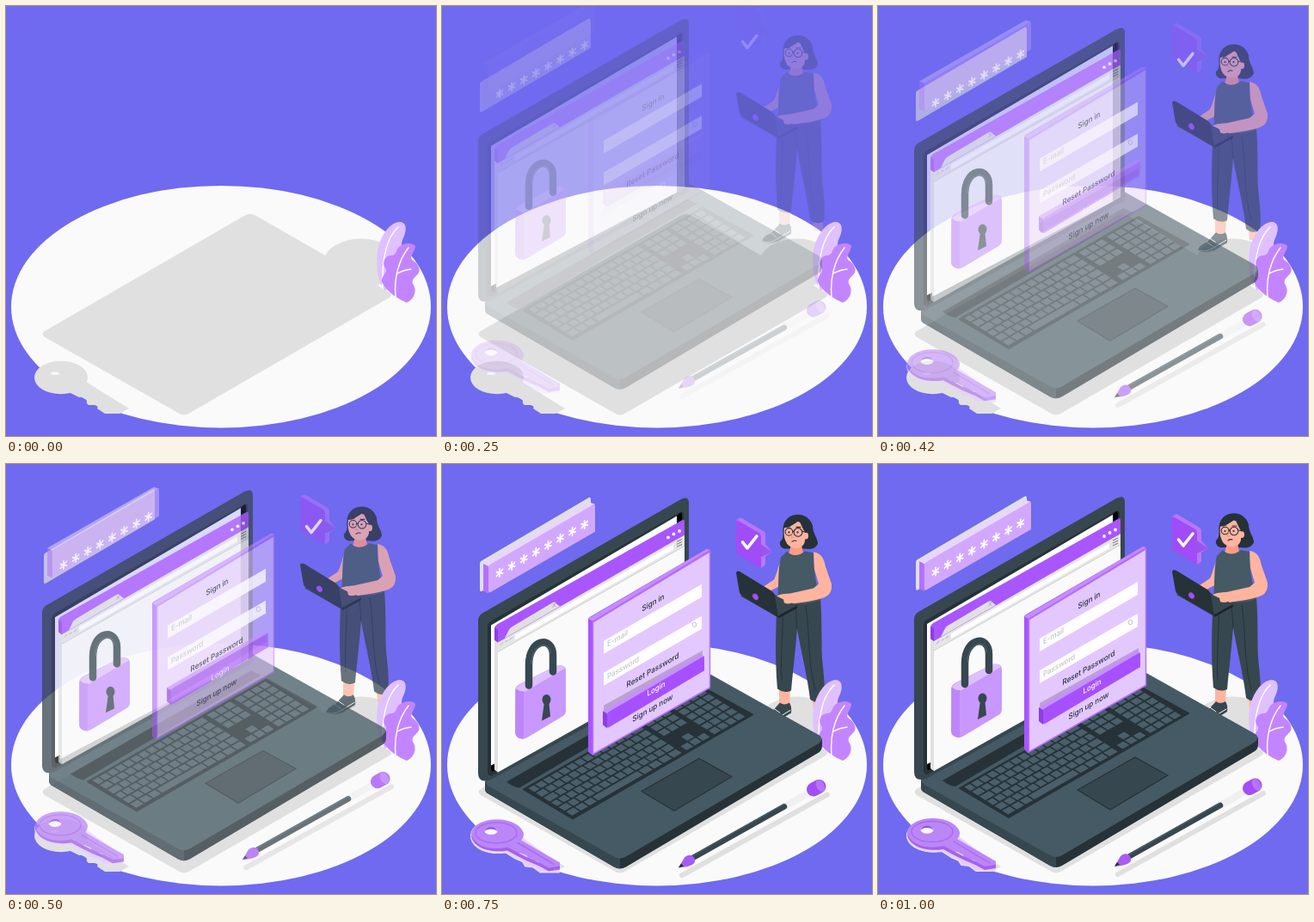
An HTML page for the animation above (1.04 s loop, 500x500 px).

```html
<!DOCTYPE html>
<html lang="en">
<head>
<meta charset="utf-8">
<title>Sign in</title>
<style>
html, body { margin: 0; width: 100%; height: 100%; overflow: hidden; background: #6f6aef; }
svg { display: block; width: 100vw; height: 100vh; }
text { font: 500 9.2px Inter, Roboto, sans-serif; fill: #263238; }
.line { fill: none; stroke-linecap: round; stroke-linejoin: round; }
</style>
</head>
<body>
<svg viewBox="0 0 500 500">
  <ellipse cx="250" cy="349.7" rx="244" ry="140.8" fill="#fafafa"/>

  <!-- floor shadows -->
  <g fill="#e0e0e0">
    <ellipse cx="413" cy="299" rx="44" ry="28.5"/>
    <path d="M45 378 L277 244 Q284 240 291 244 L446 333 Q450 336 446 339 L214 473 Q207 478 200 473 L45 385 Q40 381 45 378Z"/>
    <ellipse cx="64" cy="432" rx="31" ry="19.3"/>
    <path d="M93 437 L143 468 L132 474 H115 L106 468 Q108 465 103 464 L96 464 Q93 462 94 459 Q90 454 85 455 L73 449Z"/>
  </g>
  <ellipse cx="57" cy="427.3" rx="5" ry="1.7" fill="#fafafa"/>

  <!-- woman -->
  <g data-depth="1">
    <path d="M397 70 C401 54 425 52 431 70 C431 80 437 84 437 91 C434 98 427 98 421 97 L402 97 C396 98 392 94 393 89 C399 84 395 78 397 70Z" fill="#263238"/>
    <path d="M392 261 H405 L404 279 L392 278Z M431 272 H443 V284 L432 285Z" fill="#ffb4a0"/>
    <path d="M404 276 Q407 281 406 288 L391 297 Q378 301 372 297 Q373 291 383 287 L393 276 Q398 280 404 276Z" fill="#37474f"/>
    <path d="M373 297 Q381 300 390 294 L405 285 M382 287 L389 292 M386 283 L393 288" class="line" stroke="#fafafa" stroke-width="1"/>
    <path d="M390 156 L440 155 C442 180 441 205 442 225 C444 245 446 260 444 274 Q435 278 428 272 C425 245 417 215 413 190 C411 215 408 240 406 262 Q398 266 390 260 C387 225 388 185 390 156Z" fill="#37474f"/>
    <path d="M413 190 L411 164 M423 164 C428 195 425 230 434 262 M396 166 C397 200 393 225 395 250" class="line" stroke="#263238" stroke-width="1"/>
    <path d="M398 105 C391 113 390 126 386 133 L374 141 L380 147 L395 139 L405 112Z" fill="#ffb4a0"/>
    <path d="M406 92 H418 L420 103 Q412 111 403 104Z" fill="#ff9c85"/>
    <path d="M401 100 Q410 109 422 100 L433 102 C431 116 434 135 440 157 Q417 165 390 157 C392 140 390 124 394 107Z" fill="#455a64"/>
    <path d="M432 101 C441 102 444 108 446 118 L453 138 Q454 149 446 153 C432 159 414 159 404 162 Q394 162 390 157 L391 151 L405 149 L432 143 L438 138 L433 121Z" fill="#ffb4a0"/>
    <path d="M398 72 C402 64 416 63 422 70 L422 88 C420 99 406 98 401 91 C398 86 397 80 398 72Z" fill="#ffb4a0"/>
    <path d="M397 73 C404 72 411 68 415 64 C419 71 420 77 425 80 L430 70 L419 60 L404 60Z" fill="#263238"/>
    <ellipse cx="423" cy="82" rx="3" ry="4" fill="#ffb4a0"/>
    <g class="line" stroke="#263238" stroke-width="1.1">
      <circle cx="403.5" cy="77.5" r="4.3"/><circle cx="414" cy="78" r="4.8"/>
      <path d="M408 77 H409 M419 77 L424 78 M401 72 L405 71 M412 72 L417 72 M407 89 Q410 87 412 88"/>
    </g>
    <g fill="#263238"><circle cx="403.5" cy="78" r="1.1"/><circle cx="413.5" cy="78" r="1.1"/></g>
    <path d="M408 79 L406 84 H409" class="line" stroke="#f28f7a" stroke-width="1"/>
    <path d="M347 152 L372 143 L413 163 L391 177Z" fill="#37474f"/>
    <path d="M342 125 Q343 122 347 124 L383 146 Q386 148 387 151 L391 177 L351 153 Q347 151 346 148Z" fill="#263238"/>
    <path d="M391 175 L413 163 L413 166 L391 178Z" fill="#1b252a"/>
    <ellipse cx="364.5" cy="153" rx="3" ry="4" transform="rotate(-35 364.5 153)" fill="#a24dff"/>
    <path d="M389 152 Q397 148 409 150 L412 157 Q404 163 398 160 L397 156Z" fill="#ffb4a0"/>
  </g>

  <!-- leaves -->
  <path d="M441 331 C432 322 430 302 432 284 C436 266 446 252 458 251 C467 252 466 262 461 272 C457 284 463 300 455 320Z" fill="#dfc1ff"/>
  <path d="M438 328 C437 300 440 272 456 257" class="line" stroke="#fff" stroke-width="1.4"/>
  <path d="M466 345 C457 341 444 334 437 321 C436 314 443 311 442 306 C436 298 441 291 447 290 C454 291 453 284 457 280 C462 276 472 274 476 279 C476 285 469 291 472 295 C479 299 482 306 480 310 C477 315 471 317 473 323 C478 330 476 340 466 345Z" fill="#c385ff"/>
  <path d="M453 338 C451 318 456 296 468 281 M455 311 Q462 307 471 306" class="line" stroke="#fff" stroke-width="1.4"/>

  <!-- laptop -->
  <g data-depth="1">
    <path d="M50 367 V376 Q50 380 54 382 L200 467 Q207 471 214 467 L438 334 Q442 331 442 326 V318 L207 440Z" fill="#263238"/>
    <path d="M50 367 V376 Q50 380 54 382 L200 467 Q204 469 207 469 V450Z" fill="#37474f"/>
    <path d="M54 362 L287 229 L437 313 Q446 318 437 324 L214 455 Q207 459 200 455 L54 373 Q47 368 54 362Z" fill="#455a64"/>
    <path d="M75 368 L285 248 L297 253 L90 375 Q82 374 75 368Z" fill="#263238"/>
    <path d="M95 377 L303 258 L361 290 L152 411Z" fill="#263238" stroke="#263238" stroke-width="2" stroke-linejoin="round"/>
    <g id="keys" transform="matrix(208 -119 56 35 95 376)" fill="#4a5f69"/>
    <path d="M232 379 L299 341 L337 362 L270 402Z" fill="#37474f" stroke="#263238" stroke-width="1.2"/>
    <path d="M42 181 Q42 175 47 172 L277 40 Q287 35 287 44 V239 L56 366 Q42 370 42 358Z" fill="#37474f"/>
    <path d="M53 188 Q53 183 57 181 L276 55 Q281 52 281 58 V234 L58 361 Q53 362 53 356Z" fill="#263238"/>
    <path d="M57 186 L273 59 V240 L57 354Z" fill="#fff"/>
    <path d="M273 59 L277 55 Q279 55 279 58 V64 L273 67Z M57 349 L63 346 V354 Q57 358 57 353Z" fill="#000"/>
  </g>

  <!-- browser window -->
  <g data-depth="1">
    <path d="M61 187 L65 190 V357 L61 354Z" fill="#e0e0e0"/>
    <path d="M65 205 L282 81 V235 L65 357Z" fill="#fafafa"/>
    <path d="M65 205 L282 81 V94 L65 217Z" fill="#e6e6e6"/>
    <path d="M85 197 L269 92 V98 L85 203Z" fill="#fff"/>
    <path d="M65 217 L282 94" stroke="#d0d0d0"/>
    <path d="M61 190 Q61 187 64 185 L279 64 Q282 62 282 66 V81 L65 206 L61 203Z" fill="#a956ff"/>
    <path d="M61 189 L65 191 V206 L61 203Z" fill="#8f3de0"/>
    <path d="M73 201 L77 193 Q78 190 81 188 L128 160 Q132 158 133 161 L137 164Z" fill="#e0e0e0"/>
    <path d="M129 161 L132 164 M132 160 L129 165 M68 209 L71 206 M74 205 L76 204 M79 203 L82 200" class="line" stroke="#9e9e9e" stroke-width=".8"/>
    <path d="M273 89 L279 86 M273 92 L279 89 M273 95 L279 92" stroke="#777" stroke-width="1"/>
    <g fill="#fff"><circle cx="263" cy="84" r="1.9"/><circle cx="269.5" cy="80" r="1.9"/><circle cx="276" cy="76.5" r="1.9"/></g>
  </g>

  <!-- padlock -->
  <g data-depth="1">
    <path d="M85 262 Q85 257 91 254 L133 233 Q144 231 144 239 V285 Q144 290 140 292 L100 316 Q92 321 87 315 Q85 313 85 310Z" fill="#c998ff"/>
    <path d="M86 259 L92 254 L133 233 Q141 232 143 236 L97 263 Q90 264 86 259Z" fill="#dfc0ff"/>
    <path d="M86 260 Q91 264 95 263 V318 Q85 318 85 310Z" fill="#be86fa"/>
    <path d="M101 256 V232 C101 201 129 198 129 221 V240" class="line" stroke="#37474f" stroke-width="8.5"/>
    <path d="M104 230 C105 208 124 203 126 218" class="line" stroke="#455a64" stroke-width="2"/>
    <ellipse cx="121.5" cy="272.5" rx="5" ry="6" fill="#37474f"/>
    <path d="M119 275 L124 272 L126 292 L116 297Z" fill="#37474f"/>
  </g>

  <!-- key -->
  <g data-depth="1">
    <path d="M34 430 V433 C36 445 52 453 74 450 L85 457 L94 461 L97 466 L106 467 L114 473 H136 V465 L95 435Z" fill="#e2ccff" stroke="#e9d9ff" stroke-width="2" stroke-linejoin="round"/>
    <path d="M34 429 C36 407 88 406 95 428 Q95 433 92 436 L137 462 V468 L124 469 L113 463 Q114 460 108 460 L101 460 Q99 457 99 454 L92 451 L87 451 L76 445 C56 450 36 443 34 429Z" fill="#bb86f8"/>
    <path d="M34 429 V432 C38 446 58 451 76 448 L87 454 L99 460 L113 466 L124 472 L137 470 V466 L124 468 L113 462 L99 456 L76 444 C56 449 37 442 34 429Z" fill="#a561ec"/>
    <ellipse cx="63" cy="427.5" rx="24" ry="12" class="line" stroke="#a768ee" stroke-width="1.3"/>
    <path d="M88 439 L130 464" class="line" stroke="#a768ee" stroke-width="1.3"/>
    <ellipse cx="57" cy="425.5" rx="7.5" ry="4.2" fill="#fafafa"/>
    <path d="M49.5 426 C51 419 63 419 64.500 426 C62 422 52 422 49.500 426Z" fill="#9450dc"/>
  </g>

  <!-- pencil -->
  <g data-depth="1">
    <path d="M279 477 L448 383" class="line" stroke="#e0e0e0" stroke-width="6"/>
    <path d="M398 397 L428 380" stroke="#f0f0f0" stroke-width="8"/>
    <path d="M291 457 L398 397" class="line" stroke="#37474f" stroke-width="6.5"/>
    <path d="M292 454 L397 394.500" class="line" stroke="#455a64" stroke-width="1.5"/>
    <path d="M275 468 L282 456 Q286 452 291 454 Q296 458 293 463 Q289 467 275 468Z" fill="#a85cf5"/>
    <path d="M275 468 L278 463 L281 466Z" fill="#263238"/>
    <path d="M432 377 L438.500 373.500" class="line" stroke="#a24df5" stroke-width="16"/>
    <ellipse cx="440" cy="373" rx="4.500" ry="7.500" transform="rotate(-28 440 373)" fill="#b673ff"/>
  </g>

  <!-- password tile -->
  <g data-depth="1">
    <path d="M44 114 Q44 112 46 111 L170 38 Q173 36 173 40 V72 L47 146 Q44 148 44 145Z" fill="#e0e0e0"/>
  </g>
  <g data-depth="2" data-fade="2">
    <path d="M48 113 L54 116 V148 L48 145Z" fill="#b372ff"/>
    <path d="M48 113 L172 42 L178 44 L54 116Z" fill="#e9d6ff"/>
    <path d="M54 117 Q54 115 56 114 L175 45 Q178 43 178 46 V76 L57 146 Q54 148 54 145Z" fill="#d2a8ff"/>
  </g>
  <g id="stars" data-depth="1" class="line" stroke="#fff" stroke-width="2"/>

  <!-- tick bubble -->
  <g data-depth="3" data-fade="2">
    <path d="M342 61 L347 58 L374 74 Q376 75 376 78 V89 L384 98 L376 103 V113 L371 117Z" fill="#b777ff"/>
    <path d="M371 89 L384 98 L371 104Z" fill="#9a55ea"/>
    <path d="M342 63 Q342 60 345 62 L369 76 Q371 78 371 80 V115 Q371 118 369 116 L344 101 Q342 100 342 98Z" fill="#a04cf7"/>
  </g>
  <path data-depth="2" d="M349.500 88 L355 95 L366 81" class="line" stroke="#fff" stroke-width="3.500"/>

  <!-- sign-in card -->
  <g data-depth="2" data-fade="2">
    <path d="M170 178 Q170 176 172 175 L308 96 L312 97 L312 258 L175 336 L170 332Z" fill="#a855ff"/>
    <path d="M170 177 L308 96 L312 97 L175 180Z" fill="#c58cff"/>
    <path d="M175.500 181 L311.500 99 V257 L175.500 334.500Z" fill="#e3c8ff" stroke="#b673ff" stroke-width="1.400"/>
    <path d="M188 278 L303 214 V222 L188 290Z" fill="#baa2cf"/>
  </g>
  <g data-depth="2" fill="#fff">
    <path d="M188 203 L302 137 V152 L188 218Z M188 240 L302 174 V189 L188 255Z"/>
    <ellipse cx="293.500" cy="184" rx="2.300" ry="2.800" fill="none" stroke="#c4c4c4"/>
  </g>
  <g data-depth="3" data-fade="2">
    <path d="M187 283 L301 217 L305 219 L192 286Z" fill="#c48fff"/>
    <path d="M187 283 L192 286 V303 L187 299Z" fill="#8f3de0"/>
    <path d="M192 287 Q192 285 194 284 L303 220 Q305 219 305 221 V236 L194 302 Q192 303 192 301Z" fill="#a650ff"/>
  </g>
  <g id="labels" data-depth="2"/>
</svg>
<script>
const $ = id => document.getElementById(id);
const LOOP = 1040, FPS = 24, DROP = 30;

function add(parent, tag, attrs, content) {
  const el = document.createElementNS('http://www.w3.org/2000/svg', tag);
  for (const k in attrs) el.setAttribute(k, attrs[k]);
  if (content) el.textContent = content;
  parent.append(el);
}

// Keyboard in unit coordinates, skewed into place by its group.
const key = (x, y, width) => add($('keys'), 'rect', { x, y, width, height: .125 });
for (let row = 0; row < 6; row++) {
  const y = .04 + row * .157, shift = row % 3 * .012;
  if (row < 5) {
    key(.015, y, .03 + shift);
    for (let i = 0; i < 12; i++) key(.053 + shift + i * .0435, y, .036);
    key(.575 + shift, y, .055 - shift);
  } else {
    for (const x of [.015, .064, .113]) key(x, y, .041);
    key(.162, y, .25);
    for (const x of [.42, .474, .528, .582]) key(x, y, .046);
  }
  if (row < 3) for (let i = 0; i < 3; i++) key(.655 + i * .046, y, .038);
  for (let i = 0; i < 4; i++) key(.81 + i * .045, y, .037);
}
key(.701, .825 - .157, .038);
for (let i = 0; i < 3; i++) key(.655 + i * .046, .825, .038);

for (let i = 0; i < 8; i++) add($('stars'), 'path', {
  d: 'M0-4.500V4.500M-4-2.300L4 2.300M-4 2.300L4-2.300',
  transform: `matrix(.87 -.4 0 1 ${67 + i * 14.1} ${125 - i * 8})`
});

function label(content, x, y, fill = '#263238', anchor = 'middle') {
  add($('labels'), 'text', {
    transform: `matrix(.866 -.5 0 1 ${x} ${y})`, 'text-anchor': anchor, style: `fill:${fill}`
  }, content);
}
label('Sign in', 245.5, 161.5);
label('E-mail', 192, 210, '#c4c4c4', 'start');
label('Password', 192, 248, '#c4c4c4', 'start');
label('Reset Password', 245, 240);
label('Login', 249, 261.5, '#fff');
label('Sign up now', 245, 284);

// cubic-bezier(.36, -.01, .5, 1.38)
const bez = (s, a, b) => 3 * (1 - s) ** 2 * s * a + 3 * (1 - s) * s * s * b + s ** 3;
function ease(x) {
  let lo = 0, hi = 1;
  for (let i = 0; i < 24; i++) {
    const mid = (lo + hi) / 2;
    if (bez(mid, .36, .5) < x) lo = mid; else hi = mid;
  }
  return bez(hi, -.01, 1.38);
}

const parts = [...document.querySelectorAll('[data-depth]')];
function draw(ms) {
  const step = Math.floor((ms % LOOP + 5) * FPS / 1000);
  const p = step < 2 ? 0 : ease(Math.min(1, step / FPS));
  const alpha = Math.min(1, Math.max(0, p));
  for (const el of parts) {
    const { depth, fade = 1 } = el.dataset;
    el.setAttribute('transform', `translate(0 ${(p - 1) * DROP * depth})`);
    el.setAttribute('opacity', alpha ** fade);
  }
}

const start = performance.now();
function tick() {
  draw(performance.now() - start);
  requestAnimationFrame(tick);
}
tick();
</script>
</body>
</html>
```
